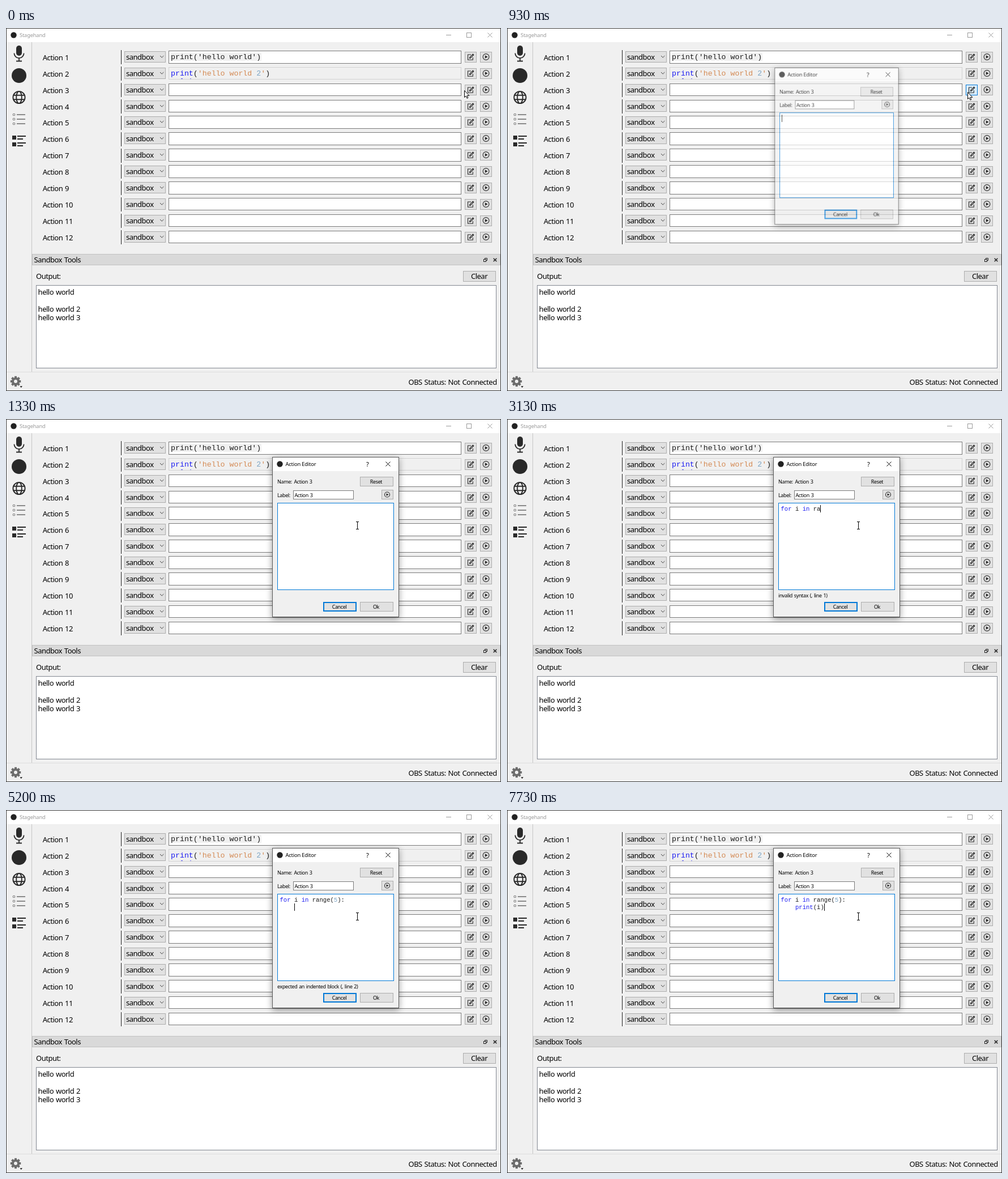
These frames come from a looping animation (874x641 px, 8 s). An HTML page with a canvas:

```html
<!DOCTYPE html>
<html lang="en">
<head>
<meta charset="utf-8">
<title>Action editor</title>
<style>
html, body { margin: 0; width: 100%; height: 100%; overflow: hidden; background: #f0f0f0; }
canvas { display: block; width: 874px; height: 641px; }
</style>
</head>
<body>
<canvas id="stage" width="874" height="641"></canvas>
<script>
const LOOP = 8000, W = 874, H = 641, ROW = 28.87;
const stage = document.getElementById('stage').getContext('2d');
const layer = Object.assign(document.createElement('canvas'), { width: W, height: H });
const layerCtx = layer.getContext('2d');
let c = stage;

// Text styles: size, letter spacing, word spacing
const UI = [13, -0.5, 1], SMALL = [9, -0.38, 0.8], CAPTION = [9.3, -0.17, 0];
const BLUE = '#0078d7', INK = '#2a2a2a';

// Each key press: time and the text it adds
const KEYS = [
  [1800, 'f'], [1900, 'o'], [1970, 'r'], [2070, ' '], [2270, 'i'], [2470, ' '], [2530, 'i'],
  [2670, 'n'], [2730, ' '], [3030, 'r'], [3130, 'a'], [3270, 'n'], [3330, 'g'], [3430, 'e'],
  [3730, '('], [4030, '5'], [4470, ')'], [4730, ':'], [5200, '\n    '],
  [5570, 'p'], [5670, 'r'], [5730, 'i'], [5830, 'n'], [5930, 't'],
  [6170, '('], [6400, 'i'], [7130, ')']
];
const BLINKS = [1330, 1870, 2400, 2970, 3500, 4000, 4570, 5070, 5600, 6130, 6670, 7200, 7730];
const MESSAGES = [
  [0, ''], [1970, 'invalid syntax (, line 1)'], [3730, 'unexpected EOF while parsing (, line 1)'],
  [4470, 'invalid syntax (, line 1)'], [4730, 'expected an indented block (, line 1)'],
  [5200, 'expected an indented block (, line 2)'], [5570, ''],
  [6170, 'unexpected EOF while parsing (, line 2)'], [7130, '']
];
const MOUSE = [[30, 809, 110], [570, 820, 109], [800, 820, 109], [930, 813, 113], [1170, 620, 188]];
const OPEN = 870, OPEN_TIME = 230;

function text(s, x, y, style = UI, color = '#000', align = 'left') {
  c.font = `${style[0]}px "Noto Sans", "Open Sans", sans-serif`;
  c.letterSpacing = style[1] + 'px';
  c.wordSpacing = style[2] + 'px';
  c.textAlign = align;
  c.fillStyle = color;
  c.fillText(s, x, y);
}

function code(s, x, y, size, plain) {
  c.font = `${size}px "Liberation Mono", monospace`;
  c.letterSpacing = c.wordSpacing = '0px';
  c.textAlign = 'left';
  let quoted = false;
  for (const word of s.match(/\w+|\W/g) || []) {
    const mark = word === "'";
    let color = '#1c1c1c';
    if (!plain) {
      if (/^\d/.test(word)) color = '#7ba4c4';
      else if (mark || quoted) color = '#d48a54';
      else if (/^(for|in|print)$/.test(word)) color = '#1c1cf2';
    }
    if (mark) quoted = !quoted;
    c.fillStyle = color;
    c.fillText(word, x, y);
    x += c.measureText(word).width;
  }
}

function fill(x, y, w, h, color) {
  c.fillStyle = color;
  c.fillRect(x, y, w, h);
}

function box(x, y, w, h, bg, edge, line = 1) {
  fill(x, y, w, h, edge);
  fill(x + line, y + line, w - 2 * line, h - 2 * line, bg);
}

const button = (x, y, w, h) => box(x, y, w, h, '#e1e1e1', '#adadad');

function disc(x, y, r, color) {
  c.beginPath();
  c.arc(x, y, r, 0, 7);
  c.fillStyle = color;
  c.fill();
}

function lines(color, width, ...paths) {
  c.strokeStyle = color;
  c.lineWidth = width;
  c.beginPath();
  for (const p of paths)
    for (let i = 0; i < p.length; i += 2) c[i ? 'lineTo' : 'moveTo'](p[i], p[i + 1]);
  c.stroke();
}

function polygon(color, ...p) {
  c.beginPath();
  for (let i = 0; i < p.length; i += 2) c.lineTo(p[i], p[i + 1]);
  c.closePath();
  c.fillStyle = color;
  c.fill();
}

function ellipse(x, y, rx, ry, from = 0, to = Math.PI * 2) {
  c.beginPath();
  c.ellipse(x, y, rx, ry, 0, from, to);
  c.stroke();
}

const cross = (x, y, r, color, width = 1) =>
  lines(color, width, [x - r, y - r, x + r, y + r], [x + r, y - r, x - r, y + r]);

function playIcon(x, y, r) {
  c.strokeStyle = INK;
  c.lineWidth = 1.1;
  ellipse(x, y, r, r);
  polygon(INK, x - r * .32, y - r * .52, x + r * .58, y, x - r * .32, y + r * .52);
}

function editIcon(x, y) {
  lines(INK, 1.1, [x + .5, y - 4, x - 5, y - 4, x - 5, y + 5.2, x + 3.8, y + 5.2, x + 3.8, y + 1]);
  lines(INK, 2.9, [x - 1.2, y + 1.6, x + 5, y - 4.6]);
  lines('#e4e4e4', 1, [x - .6, y + 1, x + 3.4, y - 3]);
  polygon(INK, x - 2.8, y + 3.2, x - 2.2, y + .4, x, y + 2.6);
}

function sidebar() {
  // microphone
  c.beginPath();
  c.roundRect(18, 31, 10, 18, 5);
  c.fillStyle = INK;
  c.fill();
  c.strokeStyle = INK;
  c.lineWidth = 1.8;
  ellipse(23, 44.5, 8.6, 8.6, 0, Math.PI);
  lines(INK, 1.8, [23, 53, 23, 58], [18, 58.5, 28, 58.5]);

  disc(23, 84, 13, '#292929');

  // globe
  c.strokeStyle = INK;
  c.lineWidth = 1.9;
  ellipse(23, 122.5, 10.6, 10.6);
  ellipse(23, 122.5, 4.8, 10.6);
  lines(INK, 1.9, [13.3, 118.8, 32.7, 118.8], [13.3, 126.2, 32.7, 126.2]);

  // lists
  for (const y of [153, 161, 169]) {
    c.strokeStyle = '#808080';
    c.lineWidth = 1.1;
    ellipse(14, y, 1.8, 1.8);
    lines('#808080', 1.8, [19, y, 34, y]);
  }
  for (const y of [190, 202]) {
    fill(11, y, 7, 7, INK);
    fill(20, y, 15, 2, INK);
    fill(20, y + 5, 10, 2, INK);
  }
}

function gear(x, y) {
  for (let i = 0; i < 8; i++) {
    const a = i * Math.PI / 4, dx = Math.cos(a), dy = Math.sin(a);
    lines('#6c6c6c', 4, [x + dx * 5, y + dy * 5, x + dx * 9.2, y + dy * 9.2]);
  }
  disc(x, y, 7, '#6c6c6c');
  disc(x, y, 3, '#f0f0f0');
  polygon('#000', x + 7.5, y + 8.5, x + 12, y + 8.5, x + 9.75, y + 11);
}

function actionRow(i, hot, pressed) {
  // Row heights are fractional, so every edge snaps by itself
  const at = y => Math.round(y + i * ROW);
  const y = at(51), top = at(40), high = at(62.6) - top;
  text('Action ' + (i + 1), 64.7, y + 6);
  fill(203, at(39.4), 1, at(64.4) - at(39.4), '#222');
  button(209, at(41), 73, 20);
  text('sandbox', 212, y + 5);
  lines('#444', 1, [272, y - 2, 275.2, y + 1.2, 278.4, y - 2]);

  if (i === 1) {
    box(287, top, 517, high, '#f0f0f0', '#d2d2d2');
    code("print('hello world 2')", 291, y + 4, 13.27);
    fill(309, y + 9, 3, 1, '#5050f0');
    fill(325, y + 9, 2, 1, '#8080f0');
  } else {
    box(287, top, 517, high, '#fff', '#7a7a7a');
  }
  if (i === 0) {
    fill(291, y - 7, 160, 14, '#f0f0f0');
    code("print('hello world')", 291, y + 4, 13.27, true);
  }

  if (pressed) box(810, y - 9, 21, 19, '#cce4f7', '#005499');
  else if (hot) box(810, y - 9, 21, 19, '#d9ecfa', BLUE);
  else button(810, y - 9, 21, 19);
  editIcon(820.5, y);
  button(837, y - 9, 21, 19);
  playIcon(847.5, y, 5.4);
}

function mainWindow(active, hot, pressed) {
  fill(0, 0, W, H, '#f0f0f0');
  fill(0, 0, W, 25, '#fff');
  const ink = active ? '#000' : '#999';
  disc(13.5, 12.5, 5.2, '#222');
  text('Stagehand', 24, 16, CAPTION, ink);
  lines(ink, 1, [777, 12.5, 786, 12.5]);
  c.strokeRect(813.5, 8.5, 8, 8);
  cross(854.5, 12.5, 4, ink);

  fill(45, 25, 1, 582, '#c6c6c6');
  sidebar();
  for (let i = 0; i < 12; i++) actionRow(i, hot && i === 2, pressed && i === 2);

  box(46, 399, 827, 20, '#d9d9d9', '#c2c2c2');
  text('Sandbox Tools', 49.5, 414);
  lines('#222', 1, [845.5, 408, 845.5, 406.5, 849.5, 406.5, 849.5, 410.5, 848, 410.5]);
  c.strokeRect(843.5, 408.5, 4, 4);
  cross(863.5, 409.5, 2.8, '#222', 1.5);
  text('Output:', 53, 443);
  button(807, 429, 58, 19);
  text('Clear', 835.5, 443, UI, '#000', 'center');
  box(53, 454, 813, 147, '#fff', '#828790');
  ['hello world', '', 'hello world 2', 'hello world 3'].forEach((s, i) => text(s, 56.6, 470.5 + i * 15.2));

  fill(0, 607, W, 1, '#dcdcdc');
  gear(17, 624);
  text('OBS Status: Not Connected', 710.5, 630);
  c.strokeStyle = '#3a3a3a';
  c.lineWidth = 1;
  c.strokeRect(.5, .5, W - 1, H - 1);
}

// The caret toggles on a steady beat; a key press always shows it
function caretOn(t) {
  let on = true, last = 0;
  const typed = (from, to) => KEYS.some(k => k[0] > from && k[0] <= to);
  for (const b of BLINKS) {
    if (b > t) break;
    on = !(on || typed(last, b));
    last = b;
  }
  return on || typed(last, t);
}

function dialog(t) {
  c.save();
  c.shadowColor = 'rgba(0,0,0,.4)';
  c.shadowBlur = 11;
  c.shadowOffsetY = 3;
  fill(470, 67, 224, 283, '#5a5a5a');
  c.restore();
  fill(471, 68, 222, 281, '#f0f0f0');
  fill(471, 68, 222, 24, '#fff');
  disc(483.5, 79.5, 5.2, '#222');
  text('Action Editor', 493.5, 83, CAPTION);
  text('?', 638.5, 83.5, [11, 0, 0], '#000', 'center');
  cross(674.5, 79.5, 4, '#000');

  text('Name:', 479, 114, SMALL);
  text('Action 3', 508.5, 114, SMALL);
  button(625, 102, 59, 17);
  text('Reset', 653.5, 114, SMALL, '#000', 'center');
  text('Label:', 479, 138, SMALL);
  box(507, 126, 107, 16, '#fff', '#7a7a7a');
  text('Action 3', 509.5, 137.5, SMALL);
  button(663, 125, 21, 17);
  playIcon(673, 133.5, 4.5);

  box(479, 148, 206, 154, '#fff', BLUE);
  const rows = KEYS.filter(k => k[0] <= t).map(k => k[1]).join('').split('\n');
  rows.forEach((s, i) => code(s, 483.5, 162 + i * 13, 10.6));
  if (caretOn(t)) {
    const n = rows.length - 1;
    fill(Math.floor(483.5 + rows[n].length * 6.38), 152 + n * 13, 1, 13, '#000');
  }

  text(MESSAGES.filter(m => m[0] <= t).pop()[1], 479, 315, SMALL);
  box(560, 323, 59, 17, '#e1e1e1', BLUE, 2);
  text('Cancel', 588.5, 335, SMALL, '#000', 'center');
  button(625, 323, 59, 17);
  text('Ok', 653.5, 335, SMALL, '#000', 'center');
}

function openingDialog(t) {
  const p = Math.min(1, (t - OPEN) / OPEN_TIME);
  if (p === 1) return dialog(t);
  const e = 1 - (1 - p) ** 4, scale = .93 + .07 * e;
  c = layerCtx;
  c.clearRect(0, 0, W, H);
  dialog(t);
  c = stage;
  c.save();
  c.globalAlpha = e;
  c.translate(582, 208.5);
  c.scale(scale, scale);
  c.drawImage(layer, -582, -208.5);
  c.restore();
}

function mouseAt(t) {
  let a = MOUSE[0];
  for (const b of MOUSE) {
    if (t < b[0]) {
      const p = Math.max(0, (t - a[0]) / (b[0] - a[0] || 1)), e = p * p * (3 - 2 * p);
      return [a[1] + (b[1] - a[1]) * e, a[2] + (b[2] - a[2]) * e];
    }
    a = b;
  }
  return [a[1], a[2]];
}

function pointer(x, y, beam) {
  x = Math.round(x);
  y = Math.round(y);
  if (beam) {
    lines('#000', 1, [x + .5, y - 6, x + .5, y + 6],
      [x - 2, y - 6.5, x + 3, y - 6.5], [x - 2, y + 6.5, x + 3, y + 6.5]);
    return;
  }
  c.save();
  c.translate(x, y);
  polygon('#fff', .5, .5, .5, 12.5, 3, 10, 5, 14.2, 6.8, 13.4, 5, 9.4, 8.8, 9.4);
  c.strokeStyle = '#000';
  c.lineWidth = 1;
  c.stroke();
  c.restore();
}

function draw(t) {
  const [x, y] = mouseAt(t);
  const hot = x > 810 && x < 831 && y > 100 && y < 119;
  mainWindow(t >= 30 && t < OPEN, hot, t >= 800 && t < OPEN);
  if (t >= OPEN) openingDialog(t);
  pointer(x, y, t >= OPEN && x > 479 && x < 685 && y > 148 && y < 302);
}

const start = performance.now();
function tick() {
  draw((performance.now() - start) % LOOP);
  requestAnimationFrame(tick);
}
tick();
</script>
</body>
</html>
```
